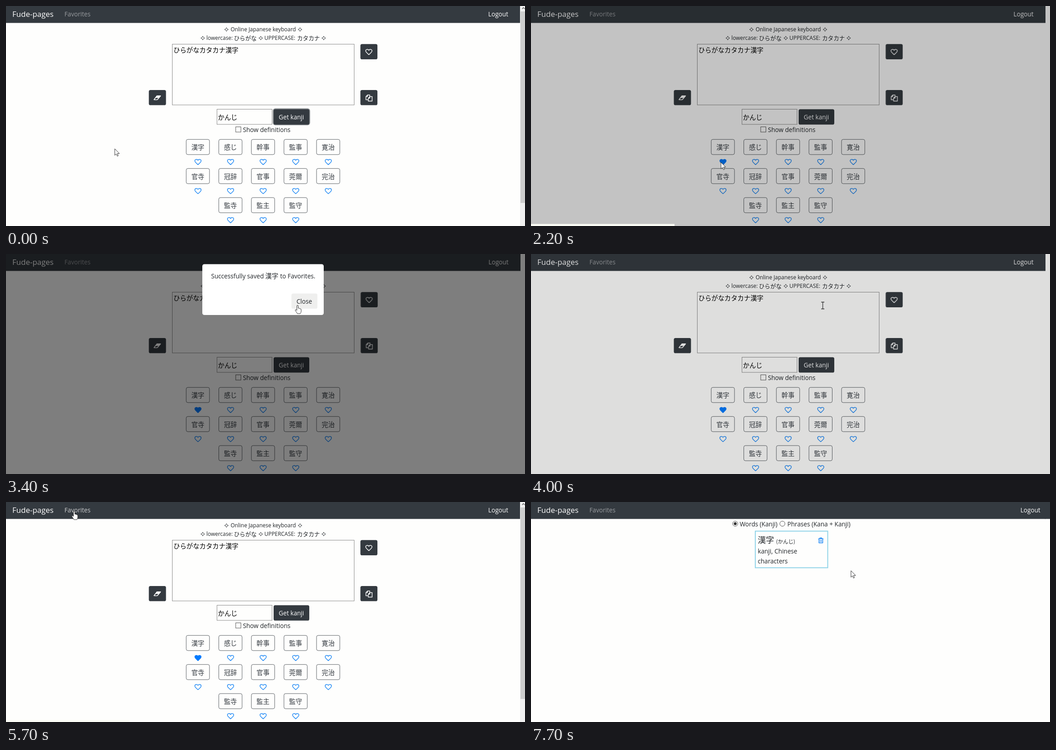
Animation of 1150 by 487 pixels, one loop 7800 ms. Source, as an HTML page:

```html
<!DOCTYPE html>
<html lang="ja">
<head>
<meta charset="utf-8">
<title>Japanese keyboard</title>
<style>
html, body { margin: 0; height: 100%; overflow: hidden; background: #fefefd; }
svg { display: block; width: 100vw; height: 100vh; }
text { font: 13.65px "Open Sans", "Noto Sans", sans-serif; fill: #212529; white-space: pre; }
.small { font-size: 11.95px; }
.ja { font: 14.4px "Noto Sans CJK JP", "Noto Sans CJK", sans-serif; }
.ja.small { font-size: 12.6px; }
.ink { fill: #000; }
.light { fill: #fff; }
.mid { text-anchor: middle; }
.brand { font-size: 17px; fill: #fff; }
.dark { fill: #343a40; }
.line { fill: none; stroke: currentColor; stroke-width: 1.4; stroke-linejoin: round; }
.blue { color: #1a86f5; }
.white { color: #fff; }

/* One loop: 78 ms per percent */
.t { animation: 7.8s linear infinite; }
.hard { animation-timing-function: step-end; }
#home { animation-name: home; }
#fav { animation-name: fav; }
#ring { animation-name: ring; }
#bar { animation-name: bar; }
.edge { animation-name: edge; }
#saved { animation-name: saved; }
#link { animation-name: link; }
#status1 { animation-name: status1; }
#status2 { animation-name: status2; }
#backdrop { animation-name: backdrop; }
#modal { animation-name: modal; }
#cursor { animation-name: move; }
#arrow { animation-name: arrow; }
#hand { animation-name: hand; }
#beam { animation-name: beam; }

@keyframes home { 0% { visibility: visible } 76.7%, 100% { visibility: hidden } }
@keyframes fav { 0% { visibility: hidden } 76.7%, 100% { visibility: visible } }
@keyframes ring { 0% { opacity: 1 } 20.26%, 100% { opacity: 0 } }
@keyframes bar { 0% { opacity: 1 } 27.9% { opacity: 0 } 52.3%, 100% { opacity: 1 } }
@keyframes edge { 0% { transform: none } 27.9% { transform: translateX(.6px) } 52.3%, 100% { transform: none } }
@keyframes saved {
  0% { color: #1a86f5; fill: none }
  12.2% { color: #16191c; fill: none }
  27.9%, 100% { color: #007bff; fill: #007bff }
}
@keyframes link { 0% { fill-opacity: .5 } 61% { fill-opacity: .75 } 76.7%, 100% { fill-opacity: .5 } }
@keyframes status1 { 0% { opacity: 0 } 12.2% { opacity: 1 } 33%, 100% { opacity: 0 } }
@keyframes status2 { 0% { opacity: 0 } 61.2% { opacity: 1 } 76.7%, 100% { opacity: 0 } }
@keyframes backdrop {
  0%, 27.2% { opacity: 0 }
  29.4%, 50% { opacity: .5 }
  51.28% { opacity: .13 }
  51.8%, 100% { opacity: 0 }
}
@keyframes modal {
  0%, 28.8% { opacity: 0; transform: translateY(-36px) }
  29.49% { opacity: .14; transform: translateY(-26px) }
  30.77% { opacity: .85; transform: translateY(-9px) }
  32% { opacity: 1; transform: translateY(-2px) }
  33%, 47.2% { opacity: 1; transform: none }
  49.4%, 100% { opacity: 0; transform: translateY(-25px) }
}
@keyframes move {
  0%, 1% { transform: translate(241px, 316px) }
  10.26% { transform: translate(400px, 349px) }
  12.8% { transform: translate(421px, 346px) }
  34.6% { transform: translate(421px, 346px); animation-timing-function: ease-in-out }
  43% { transform: translate(646px, 114px) }
  56.7% { transform: translate(646px, 114px); animation-timing-function: ease-in-out }
  61.3%, 81.4% { transform: translate(151px, 21px) }
  85.3% { transform: translate(310px, 62px) }
  95.5% { transform: translate(693px, 146px) }
  98.5%, 100% { transform: translate(709px, 152px) }
}
@keyframes arrow {
  0% { opacity: 1 } 42.5% { opacity: 0 } 58.5% { opacity: 1 } 61% { opacity: 0 } 82%, 100% { opacity: 1 }
}
@keyframes hand {
  0% { opacity: 0 } 42.5% { opacity: 1 } 50% { opacity: 0 } 61% { opacity: 1 } 82%, 100% { opacity: 0 }
}
@keyframes beam { 0% { opacity: 0 } 50% { opacity: 1 } 58.5%, 100% { opacity: 0 } }
</style>
</head>
<body>
<svg viewBox="0 0 1150 487" preserveAspectRatio="none">
  <defs>
    <path id="heart" d="M0 6C-2 4-7 .6-7-2.4C-7-6-2-7 0-3.6C2-7 7-6 7-2.4C7 .6 2 4 0 6Z"/>
    <path id="star" d="M0-4.2Q.9-.9 4.2 0Q.9.9 0 4.2Q-.9.9-4.2 0Q-.9-.9 0-4.2Z" fill="none" stroke="#212529" stroke-width=".9"/>
  </defs>
  <rect width="1150" height="487" fill="#fefefd"/>
  <rect class="dark" width="1140" height="37.5"/>
  <text class="brand" x="14" y="24">Fude-pages</text>
  <text class="light t hard" id="link" x="129.5" y="23">Favorites</text>

  <g id="home" class="t hard">
    <text class="light mid t hard edge" x="1090.7" y="23">Logout</text>

    <use href="#star" x="488.5" y="52"/>
    <text class="small mid" x="570" y="56.3">Online Japanese keyboard</text>
    <use href="#star" x="651.5" y="52"/>
    <use href="#star" x="436" y="71"/>
    <text class="small" x="444" y="75.3">lowercase:</text>
    <text class="ja small" x="505" y="75.5">ひらがな</text>
    <use href="#star" x="564.5" y="71"/>
    <text class="small" x="572.5" y="75.3">UPPERCASE:</text>
    <text class="ja small" x="645" y="75.5">カタカナ</text>
    <use href="#star" x="704" y="71"/>

    <g fill="#fefefd" stroke="#8a8a8a">
      <rect x="368.5" y="84.5" width="403" height="134.5"/>
      <rect x="467.5" y="228.5" width="122" height="33.5"/>
      <rect x="509" y="267.5" width="11.5" height="11.5" stroke="#555"/>
    </g>
    <text class="ja ink" x="371" y="103.3">ひらがなカタカナ漢字</text>
    <text class="ja ink" x="469.5" y="251.5">かんじ</text>
    <text x="525" y="279">Show definitions</text>

    <rect id="ring" class="t hard" x="591" y="226.5" width="83" height="37.5" rx="6" fill="#8f9396"/>
    <rect class="dark" x="593" y="228.5" width="79" height="34" rx="3.6"/>
    <text class="light mid" x="632.3" y="251">Get kanji</text>

    <rect class="dark" x="316.5" y="186" width="38" height="33.5" rx="3.6"/>
    <path fill="#fff" fill-rule="evenodd" d="M334.5 198H342.5Q344 198.300 343 199.800L336.300 207.500Q335.700 208.200 334.800 208.200H328Q326.600 207.800 327.500 206.400L333.300 199Q333.800 198 334.500 198ZM329.300 206.800H334.800L337.600 203.600H332Z"/>

    <g class="t hard edge">
      <rect class="dark" x="785.3" y="84.3" width="37.7" height="33.700" rx="3.6"/>
      <use href="#heart" class="line white" x="804" y="101.700"/>
      <rect class="dark" x="785.3" y="186" width="37.7" height="33.500" rx="3.6"/>
      <path class="line white" stroke-width="1.2" d="M802.500 207.500H797.500V200.500L801 197H806V200.500M801 197V200.500H797.500M806 200.500H811.300V210.500H802.700V204L806 200.500V204H802.700"/>
    </g>

    <g id="grid"></g>
    <g id="bar" class="t hard">
      <rect x="1139" width="11" height="487" fill="#f0f0f0"/>
      <rect x="1140" y="12" width="10" height="424" fill="#cdcdcd"/>
      <path d="M1143.500 6.500L1146.500 3.500L1149.500 6.500" fill="none" stroke="#555" stroke-width="1.3"/>
    </g>
  </g>

  <g id="fav" class="t hard">
    <rect class="dark" x="1139" width="11" height="37.5"/>
    <text class="light mid" x="1106.5" y="23">Logout</text>
    <g fill="none" stroke="#555">
      <circle cx="452.5" cy="48" r="5.7"/>
      <circle cx="557" cy="48" r="5.7"/>
    </g>
    <circle cx="452.5" cy="48" r="3.200" fill="#333"/>
    <text x="462.5" y="54">Words (Kanji)</text>
    <text x="568" y="54">Phrases (Kana + Kanji)</text>
    <rect x="497" y="64.500" width="160.500" height="81" fill="none" stroke="#8fd3e8" stroke-width="2"/>
    <text class="ja" style="font-size:18px" x="502.500" y="91">漢字</text>
    <text class="ja" style="font-size:11.500px" x="543" y="92">(かんじ)</text>
    <text x="502.500" y="113.500">kanji, Chinese</text>
    <text x="502.500" y="135.500">characters</text>
    <path class="line blue" d="M636.500 81.500H648M640 81V79.500H644.500V81M638 82V90.500H646.500V82M640.700 84V88.500M643.800 84V88.500"/>
  </g>

  <rect id="backdrop" class="t" width="1150" height="487"/>
  <g id="modal" class="t">
    <rect x="435" y="22.500" width="269" height="112.500" rx="4.500" fill="#fff"/>
    <text x="454.500" y="53.500">Successfully saved</text>
    <text class="ja" x="574.500" y="53.700">漢字</text>
    <text x="607.500" y="53.500">to Favorites.</text>
    <rect x="632.500" y="87.500" width="57.500" height="33.500" rx="3.600" fill="#efefee"/>
    <text class="mid" x="661" y="110">Close</text>
  </g>

  <rect id="status1" class="t hard" y="482.500" width="318" height="5" fill="#fbfcf5"/>
  <rect id="status2" class="t hard" y="482.500" width="273.500" height="5" fill="#fbfcf5"/>

  <g id="cursor" class="t" fill="#fff" stroke="#333" stroke-linejoin="round">
    <path id="arrow" class="t hard" d="M0 0V14.500L3.300 11.500L5.600 16.500L7.800 15.500L5.600 10.700H10.300Z"/>
    <path id="hand" class="t hard" d="M-1.500 8V1Q-1.500-.5 0-.5T1.500 1V6Q3.500 5 4 6.800Q5.700 6 6.200 7.600Q8 7 8 9V13Q8 15.500 6 18H-.5Q-2 15-5 11Q-5.500 9-3.800 9Q-2.500 9.300-1.500 11Z"/>
    <path id="beam" class="t hard" fill="none" stroke-width="1.3" d="M-3 -7.500H4M-3 7.500H4M.5-7.500V7.500"/>
  </g>
</svg>
<script>
const rows = [
  ['漢字', '感じ', '幹事', '監事', '寛治'],
  ['官寺', '冠辞', '官事', '莞爾', '完治'],
  ['監寺', '監主', '監守']
];

const key = (word, x, y, first) => `
  <rect x="${x - 25.8}" y="${y - 16.7}" width="51.6" height="33.6" rx="3.6"
    fill="none" stroke="#343a40" stroke-width=".8"/>
  <text class="ja mid dark" x="${x}" y="${y + 6.3}">${word}</text>
  <use href="#heart" class="line blue${first ? ' t hard' : ''}" ${first ? 'id="saved"' : ''}
    x="${x + .3}" y="${y + 33.2}"/>`;

document.getElementById('grid').innerHTML = rows.map((row, r) =>
  row.map((word, c) =>
    key(word, 569.5 + (c - (row.length - 1) / 2) * 72.2, 312 + r * 64.4, !r && !c)
  ).join('')).join('');
</script>
</body>
</html>
```
